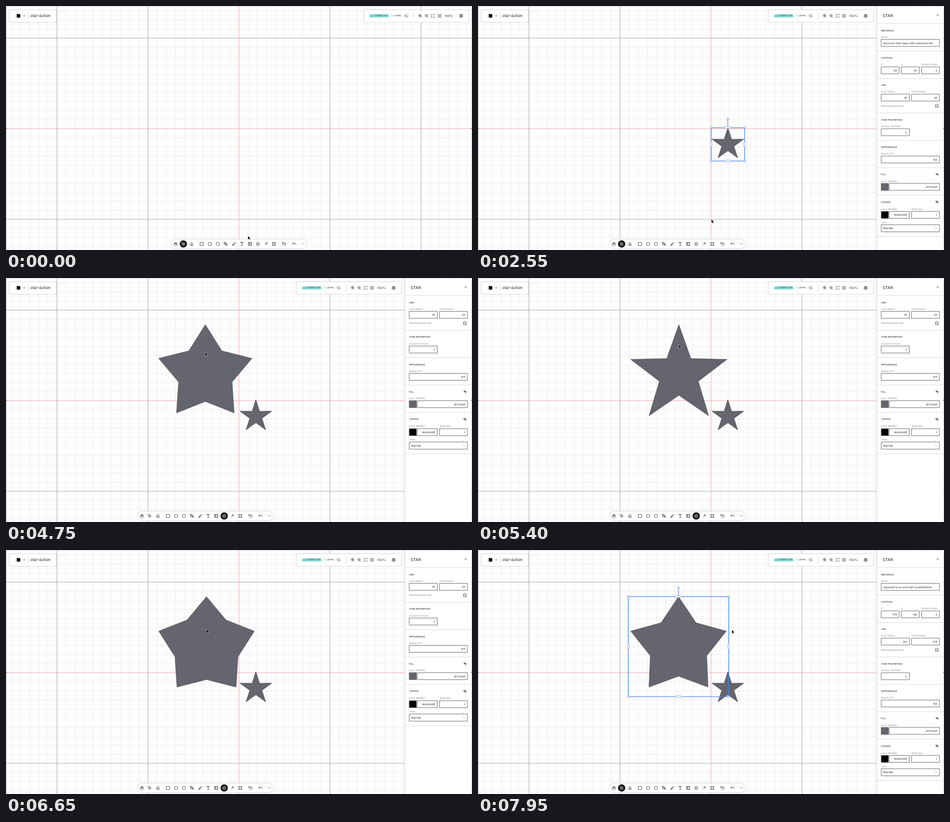
An HTML page with a canvas for the animation above (8000 ms loop, 800 by 421 pixels).

```html
<!DOCTYPE html>
<html lang="en">
<head>
<meta charset="utf-8">
<title>Star tool</title>
<style>
html, body { margin: 0; width: 100%; height: 100%; overflow: hidden; background: #fdfdfd; }
canvas { display: block; width: 800px; height: 421px; }
</style>
</head>
<body>
<canvas id="stage"></canvas>
<script>
const W = 800, H = 421, LOOP = 8000;
const OX = 400, OY = 211.75, ZOOM = 0.3125;
const INK = '#1c1c1e', STAR = '#65656f', BLUE = '#4480e6';
const PANEL_AT = 500, FIRST_AT = 1950, RETOOL_AT = 3350, DRAG_AT = 4250, DROP_AT = 7250;
const start = { x: 258, y: 80.5 };

// time, x, y of the pointer tip
const pointerKeys = [
  [0, 415.5, 397], [50, 415.5, 397], [400, 431, 408], [900, 432, 409],
  [1050, 429, 392], [1200, 427, 366], [1500, 398.5, 198.5], [1750, 400, 210],
  [2050, 400, 210], [2700, 401, 393], [2950, 371, 408], [3100, 374, 409],
  [3330, 374, 409], [3600, 307.5, 113], [3750, 307.5, 113], [3950, 258, 80.5],
  [4250, 258, 80.5], [4750, 342.2, 128.7], [5000, 346, 125], [5400, 344.8, 115.6],
  [5800, 345.4, 121], [6200, 346.5, 134], [6650, 344.2, 137.3],
  [7250, 344.25, 131.4], [7700, 344.25, 131.4], [7950, 436, 138], [8000, 436, 138]
];

const canvas = document.getElementById('stage');
const ctx = canvas.getContext('2d');
const dpr = window.devicePixelRatio || 1;
canvas.width = W * dpr;
canvas.height = H * dpr;

function pointerAt(t) {
  let i = 1;
  while (i < pointerKeys.length - 1 && pointerKeys[i][0] < t) i++;
  const [t0, x0, y0] = pointerKeys[i - 1], [t1, x1, y1] = pointerKeys[i];
  const u = Math.min(1, Math.max(0, (t - t0) / (t1 - t0)));
  const e = u * u * (3 - 2 * u);
  return { x: x0 + (x1 - x0) * e, y: y0 + (y1 - y0) * e };
}

function line(points, color, width = 0.6, close = false) {
  ctx.beginPath();
  points.forEach(([x, y]) => ctx.lineTo(x, y));
  if (close) ctx.closePath();
  ctx.strokeStyle = color;
  ctx.lineWidth = width;
  ctx.stroke();
}

function box(x, y, w, h, fill, stroke, r = 0, width = 0.7) {
  ctx.beginPath();
  ctx.roundRect(x, y, w, h, r);
  if (fill) { ctx.fillStyle = fill; ctx.fill(); }
  if (stroke) { ctx.strokeStyle = stroke; ctx.lineWidth = width; ctx.stroke(); }
}

function disc(x, y, r, fill, stroke, width = 0.6) {
  ctx.beginPath();
  ctx.arc(x, y, r, 0, 7);
  if (fill) { ctx.fillStyle = fill; ctx.fill(); }
  if (stroke) { ctx.strokeStyle = stroke; ctx.lineWidth = width; ctx.stroke(); }
}

function text(s, x, y, size, color = INK, align = 'left', weight = 400) {
  ctx.font = `${weight} ${size}px Inter, sans-serif`;
  ctx.fillStyle = color;
  ctx.textAlign = align;
  ctx.textBaseline = 'alphabetic';
  ctx.fillText(s, x, y + size * 0.36);
}

// Line icon on a path centred at x, y
function icon(d, x, y, color, scale = 1, width = 0.6) {
  ctx.save();
  ctx.translate(x, y);
  ctx.scale(scale, scale);
  ctx.strokeStyle = color;
  ctx.lineWidth = width / scale;
  ctx.lineJoin = ctx.lineCap = 'round';
  ctx.stroke(new Path2D(d));
  ctx.restore();
}

function starPoints(cx, cy, outer, inner) {
  return Array.from({ length: 10 }, (_, i) => {
    const r = i % 2 ? inner : outer, a = i * Math.PI / 5;
    return [cx + r * Math.sin(a), cy - r * Math.cos(a)];
  });
}

// Stars grow from the top left corner of their bounding square
function star(x, y, outer, inner) {
  ctx.beginPath();
  starPoints(x + outer, y + outer, outer, inner).forEach(p => ctx.lineTo(...p));
  ctx.closePath();
  ctx.fillStyle = STAR;
  ctx.fill();
  ctx.strokeStyle = '#222228';
  ctx.lineWidth = 0.5;
  ctx.stroke();
}

function grid() {
  ctx.fillStyle = '#fdfdfd';
  ctx.fillRect(0, 0, W, H);
  const step = 50 * ZOOM;
  const rule = (i, vertical) => {
    const p = (vertical ? OX : OY) + i * step;
    const ends = vertical ? [[p, 0], [p, H]] : [[0, p], [W, p]];
    if (i === 0) line(ends, '#f79ba3', 0.8);
    else if (i % 10 === 0) line(ends, '#a4a4a6', 0.8);
    else line(ends, '#e9e9ec', 0.7);
  };
  for (const major of [false, true])
    for (let i = -26; i <= 26; i++)
      if ((i % 10 === 0) === major) { rule(i, false); rule(i, true); }
  ctx.setLineDash([2, 1]);
  line([[0.5, H], [0.5, 0.5], [W - 0.5, 0.5], [W - 0.5, H]], '#b4b4b6', 0.8);
  ctx.setLineDash([]);
}

function selection(x, y, size) {
  const mid = x + size / 2, low = y + size, half = y + size / 2;
  line([[mid, y], [mid, y - 14]], BLUE, 1);
  box(x, y, size, size, null, BLUE, 0, 1.1);
  for (const px of [x, x + size])
    for (const py of [y, low]) box(px - 1.5, py - 1.5, 3, 3, '#fff', BLUE, 1);
  for (const py of [y, low]) box(mid - 5.5, py - 1.5, 11, 3, '#fff', '#7585a5', 1.2, 0.6);
  for (const px of [x, x + size]) box(px - 1.4, half - 4.5, 2.8, 9, '#fff', '#7585a5', 1.2, 0.6);
  disc(mid, y - 15.5, 1.6, '#fff', BLUE, 0.7);
}

const CHEVRON = 'M-1.5-.7L0 .8L1.5-.7';
const LENS = 'M2-.5A2.3 2.3 0 1 1-2.6-.5A2.3 2.3 0 1 1 2-.5M1.3 1.3L3 3M-1.5-.5H.9';
const CORNERS = 'M-2.5-1V-2.5H-1M1-2.5H2.5V-1M2.5 1V2.5H1M-1 2.5H-2.5V1';
const EYE_OFF = 'M-2.6 0Q0-3 2.6 0Q0 3-2.6 0M-.8 0A.8.8 0 1 0 .8 0A.8.8 0 1 0-.8 0M-2.3-2.3L2.3 2.3';

function header(shift) {
  box(5.5, 6.5, 81, 21.5, '#fff', '#d2d2d4', 1);
  ctx.fillStyle = '#000';
  ctx.fillRect(18.5, 14, 6, 6);
  icon(CHEVRON, 31.5, 17, INK);
  line([[38.5, 12], [38.5, 22]], '#ccc');
  text('star-action', 42, 17, 6.8);

  ctx.save();
  ctx.translate(shift, 0);
  box(614.5, 6.5, 180, 21.5, '#fff', '#d2d2d4', 1);
  box(624, 14, 33.2, 6, '#98e6df');
  icon('M-1.6 1.5H1.4Q2.6 1 2 0Q1.6-.8.8-.5Q0-2-1.3-1.3Q-2-.9-1.8 0Q-2.8.7-1.6 1.5', 628, 17, '#287a78', 0.85, 0.5);
  text('CONNECTED', 631, 17, 3.9, '#16383a');
  text('1', 662, 17, 3.9, '#333');
  text('USERS', 666, 17, 3.9, '#333');
  disc(687, 17, 4.7, '#ececee');
  text('TL', 687, 17, 4.8, '#333', 'center');
  line([[699.8, 12], [699.8, 22]], '#ccc');
  icon(LENS + 'M-.3-1.7V.7', 711, 17, INK, 0.95, 0.55);
  icon(LENS, 722, 17, INK, 0.95, 0.55);
  icon(CORNERS, 733, 17, INK);
  icon(CORNERS + 'M-1.1-1.1H1.1V1.1H-1.1Z', 744.3, 17, INK, 1, 0.55);
  text('100%', 753, 17, 5.4, '#333');
  icon('M-2.4-2.4H-.8V-.8H-2.4ZM.8-2.4H2.4V-.8H.8ZM-2.4.8H-.8V2.4H-2.4ZM.8.8H2.4V2.4H.8ZM-.8-.8L.8.8M.8-.8L-.8.8', 781.5, 17, INK, 1, 0.6);
  ctx.restore();
}

const tools = {
  hand: [291, 'M-1.7.3V-1.5Q-1.2-2.3-.7-1.5V-2.3Q-.1-3 .5-2.3V-1.8Q1.2-2.4 1.6-1.6V-1Q2.4-1.5 2.7-.7V.8Q2.6 3 .6 3H-.3Q-1.5 3-2.9.9Q-2.9-.2-1.7.7M-.7-1.5V-.2M.5-1.8V-.2M1.6-1V0'],
  select: [304.5, 'M-2.5-2.5L2.6-.7L.4.4L-.7 2.6ZM.4.4L2.4 2.4'],
  eraser: [318.5, 'M-1 2.5L-2.8.7L.6-2.7L2.9-.4L0 2.5H2.8M-1 2.5H0M-1.3-.8L1.2 1.6'],
  rect: [336.2, 'M-2.7-2.7H2.7V2.7H-2.7Z'],
  circle: [350, 'M2.9 0A2.9 2.9 0 1 1-2.9 0A2.9 2.9 0 1 1 2.9 0'],
  polygon: [363.7, 'M0-3L2.6-1.6V1.6L0 3L-2.6 1.6V-1.6Z'],
  pen: [377.3, 'M-2.8-2.8L1.2-1.7L2 .9L.6 2.1L-2 1.1ZM-2.8-2.8L0 0M2 .9L3 1.7L1.5 3.1L.6 2.1M.6.3A.6.6 0 1 1-.6.3'],
  brush: [391.2, 'M-.7.2L2.1-2.7Q3.2-2.6 2.8-1.7L.2 1.1ZM-.7.2Q-2.2.2-2.2 1.8Q-2.2 2.5-3 2.6Q.2 3.4.2 1.1'],
  text: [405, 'M-2.5-1.8V-2.7H2.5V-1.8M0-2.7V2.7M-1 2.7H1'],
  image: [418.8, 'M1-2.7H-2.7V2.7H2.7V0M-2.7 1.7L-.9.1L2 2.7M-.4-1A.6.6 0 1 1-1.6-1A.6.6 0 1 1-.4-1M2.3-2.9V-.7M1.2-1.8H3.3'],
  star: [432.5, 'M0-3L.9-1.1L3-.8L1.5.6L1.9 2.7L0 1.7L-1.9 2.7L-1.5.6L-3-.8L-.9-1.1Z'],
  arrow: [446.3, 'M-1.8 1.8L1.8-1.8M-.9-1.8H1.8V.9'],
  frame: [460, 'M-1.9-3V3M1.9-3V3M-3-1.9H3M-3 1.9H3'],
  tags: [477.7, 'M-3-2H0L2.1.1L-.3 2.5L-3-.2ZM1.1-2L3.1 0L.8 2.5M-1.7-.9H-1.5'],
  undo: [495, 'M-2.9-1.8V.1H-1M-2.8 0Q-1.2-1.8.8-1.3Q2.5-.8 2.9 1.3'],
  redo: [509.2, 'M2.9-1.8V.1H1M2.8 0Q1.2-1.8-.8-1.3Q-2.5-.8-2.9 1.3']
};

function toolbar(shift, active) {
  ctx.save();
  ctx.translate(shift, 0);
  box(283.2, 402.5, 233.6, 16, '#fff', '#d2d2d4', 8);
  for (const [name, [x, d]] of Object.entries(tools)) {
    const on = name === active;
    if (on) disc(x, 410.5, 6.3, '#1b1b1c');
    icon(d, x, 410.5, on ? '#fff' : name === 'redo' ? '#aaa' : INK, 1, 0.65);
  }
  ctx.restore();
}

const heading = (s, y) => text(s, 692, y, 4.15, INK);
const label = (s, x, y) => text(s, x, y, 4, '#85858a');
const divider = y => line([[684.5, y], [799, y]], '#d6d6d8', 0.8);

function field(name, value, x, y, w, labelX = x) {
  if (name) label(name, labelX, y - 4);
  box(x, y, w, 12, '#fff', '#47474a');
  text(value, x + w - 3.8, y + 6.3, 4.4, INK, 'right');
}

function swatch(y, color) {
  box(692.2, y, 12.3, 12, color, '#47474a');
}

function panel(item) {
  ctx.fillStyle = '#fff';
  ctx.fillRect(684.5, 0.8, 114.5, H);
  line([[684.5, 0], [684.5, H]], '#c8c8ca', 0.8);
  text('STAR', 694.5, 16, 7.1);
  icon('M-1.2-1.2L1.2 1.2M1.2-1.2L-1.2 1.2', 789.2, 15.7, INK, 1, 0.55);
  divider(30.2);

  ctx.save();
  if (item.name) {
    heading('METADATA', 42.5);
    label('Name', 692, 53.7);
    box(692.2, 57.7, 100, 12, '#fff', '#47474a');
    text(item.name, 695.6, 64, 4.2);
    divider(78);
    heading('POSITION', 89.6);
    field('X', item.x, 692.2, 105, 30.8);
    field('Y', item.y, 726.7, 105, 30.8);
    field('Rotation (deg)', '0', 761.4, 105, 30.8);
    divider(125.3);
    ctx.translate(0, 94.4);
  }
  heading('SIZE', 42.3);
  field('Inner Radius', item.inner, 692.2, 57.6, 48.3);
  field('Outer Radius', item.outer, 744.2, 57.6, 48);
  label('Maintain aspect ratio', 692, 78);
  icon('M2.4-.2V2.5H-2.5V-2.5H1.2M-1.2-.2L0 1L2.8-2.2', 788, 78, INK);
  divider(90.2);

  heading('STAR PROPERTIES', 102);
  field('Number of Points', '5', 692.2, 117.4, 48.3);
  divider(137.5);

  heading('APPEARANCE', 149.2);
  field('Opacity (%)', '100', 692.2, 164.5, 100);
  divider(184.6);

  heading('FILL', 196.2);
  icon(EYE_OFF, 788.2, 196, INK, 0.9, 0.5);
  swatch(211.7, STAR);
  field('Color (#RGBA)', '#71717aff', 706, 211.7, 86.2, 692);
  divider(232);

  heading('STROKE', 244);
  icon(EYE_OFF, 788, 243.6, INK, 1, 0.55);
  swatch(260, '#000');
  field('Color (#RGBA)', '#000000ff', 706, 260, 34.5, 692);
  field('Width (px)', '1', 744.2, 260, 48);
  label('Style', 692, 279);
  box(692.2, 283, 100, 12.3, '#fff', '#47474a');
  text('Normal', 695.8, 289.3, 4.8);
  icon(CHEVRON, 786.3, 289.2, '#555', 0.95, 0.5);
  divider(303.2);
  ctx.restore();
}

function pointer({ x, y }) {
  ctx.beginPath();
  [[0, 0], [0, 5.6], [1.3, 4.5], [2.2, 6.4], [3.1, 6], [2.3, 4.1], [4, 4]]
    .forEach(([dx, dy]) => ctx.lineTo(x + dx, y + dy));
  ctx.closePath();
  ctx.strokeStyle = '#fff';
  ctx.lineWidth = 0.9;
  ctx.stroke();
  ctx.fillStyle = '#000';
  ctx.fill();
}

const blank = { inner: '35', outer: '92' };
const small = { ...blank, name: '5b27c1e9-7d04-4a6e-93f8-2e80bd41c756', x: '92', y: '87' };
const large = { inner: '163', outer: '276', name: '08ade45f-0ce3-402f-b8f1-6cd0faf83228', x: '-179', y: '-145' };

function draw(t) {
  ctx.setTransform(dpr, 0, 0, dpr, 0, 0);
  ctx.textRendering = 'geometricPrecision';
  const tip = pointerAt(t);
  const open = t >= PANEL_AT;
  const firstPicked = t >= FIRST_AT && t < RETOOL_AT;
  const dropped = t >= DROP_AT;

  grid();
  if (t >= FIRST_AT) star(400.2, 210, 92 * ZOOM, 35 * ZOOM);
  if (t > DRAG_AT) {
    const end = dropped ? pointerAt(DROP_AT) : tip;
    star(start.x, start.y, end.x - start.x, end.y - start.y);
  }
  if (firstPicked) selection(400.2, 210, 184 * ZOOM);
  if (dropped) selection(start.x, start.y, 552 * ZOOM);

  header(open ? -115.8 : 0);
  toolbar(open ? -57.9 : 0, !open || firstPicked || dropped ? 'select' : 'star');
  if (open) panel(firstPicked ? small : dropped ? large : blank);
  ctx.fillStyle = '#555';
  ctx.fillRect(0, 210, 1, 2);
  ctx.fillRect(799, 210, 1, 2);
  pointer(tip);
}

function tick(now) {
  draw(now % LOOP);
  requestAnimationFrame(tick);
}
draw(0);
requestAnimationFrame(tick);
</script>
</body>
</html>
```
